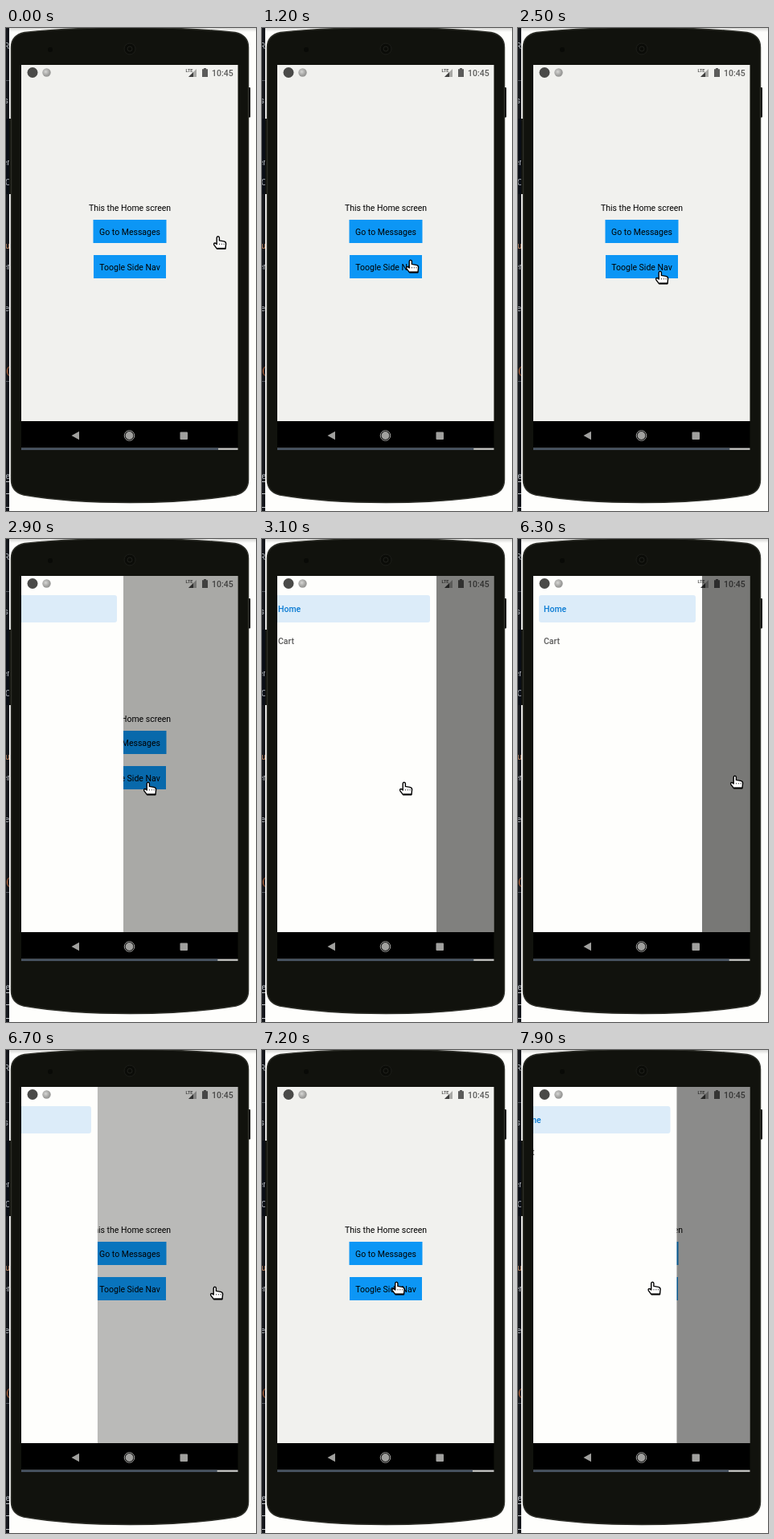
An HTML page for the animation above (8000 ms loop, 311 by 602 pixels).

```html
<!DOCTYPE html>
<html lang="en">
<head>
<meta charset="utf-8">
<title>Side navigation demo</title>
<style>
html, body { margin: 0; width: 100%; height: 100%; overflow: hidden; background: #fefefc; }
svg { display: block; width: 100%; height: 100%; }
text { font: 10.5px Roboto, sans-serif; }
.mid { text-anchor: middle; }
.medium { font-weight: 500; }
.code text { font: 11px Roboto, sans-serif; fill: #a9adb3; text-anchor: end; }
</style>
</head>
<body>
<svg viewBox="0 0 311 602" preserveAspectRatio="none">
  <defs>
    <clipPath id="screen"><rect x="19" y="46" width="269.5" height="444"/></clipPath>
    <clipPath id="editor"><rect width="4" height="602"/></clipPath>
    <linearGradient id="shade" x2="0" y2="1">
      <stop stop-color="#d8d8d6"/><stop offset="1" stop-color="#fefefc"/>
    </linearGradient>
    <radialGradient id="ball" cx=".4" cy=".4">
      <stop stop-color="#d6d6d4"/><stop offset="1" stop-color="#9a9a98"/>
    </radialGradient>
  </defs>

  <rect width="311" height="602" fill="#fefefc"/>
  <rect width="311" height="5" fill="url(#shade)"/>

  <g class="code" clip-path="url(#editor)">
    <rect width="4" height="602" fill="#15171c"/>
    <rect y="113" width="4" height="94" fill="#0a0e16"/>
    <text x="4" y="26">R</text>
    <text x="3" y="94">s</text>
    <text x="5" y="171">er</text>
    <text x="6" y="196">C</text>
    <text x="5" y="275" style="fill:#c58a64">u</text>
    <text x="5" y="301">er</text>
    <text x="4" y="353">e</text>
    <text x="4" y="431" style="fill:#d0703c">(</text>
    <text x="5" y="562">e</text>
    <path d="M0 65.5H4M0 440.5H4" stroke="#50545c"/>
    <path d="M0 565.5H4M0 580.5H4M0 597.5H4" stroke="#c4c6c9"/>
  </g>

  <g fill="#11120d">
    <rect x="4" y="113" width="4" height="94"/>
    <rect x="300" y="74" width="4" height="37.5" rx="1"/>
    <path d="M6.500 24Q6.500 9 23 5.500Q80 -.5 154 -.5T285 5.500Q301.500 9 301.500 24V563Q301.500 578 286 582Q230 591.500 154 591.500T22 582Q6.500 578 6.500 563Z" stroke="#2c2d27" stroke-width="1.500"/>
  </g>
  <circle cx="55" cy="27" r="3" fill="#090a07"/>
  <circle cx="154" cy="26" r="7" fill="#0b0c08" stroke="#1d1e19"/>
  <circle cx="154" cy="26" r="3" fill="none" stroke="#20211c"/>

  <g clip-path="url(#screen)">
    <rect x="19" y="46" width="270" height="444" fill="#f1f1ee"/>
    <text class="mid" x="154" y="228">This the Home screen</text>
    <path d="M108.500 239h91v29h-91zM109 283h90v29h-90z" fill="#0c96f5"/>
    <text class="mid" x="154" y="257.500">Go to Messages</text>
    <text class="mid" x="154" y="301.500">Toogle Side Nav</text>
    <rect id="dim" x="19" y="46" width="270" height="444"/>
    <g id="drawer">
      <rect x="19" y="46" width="210" height="444" fill="#fefefc"/>
      <rect x="26" y="70" width="195" height="34" rx="3" fill="#dcecf9"/>
      <text class="medium" x="32" y="91" fill="#0a7bd3">Home</text>
      <text class="medium" x="32" y="131" fill="#5a5a5a">Cart</text>
    </g>
    <circle cx="33" cy="55.500" r="6.500" fill="#4a4a48"/>
    <circle cx="50.500" cy="55.500" r="5.200" fill="url(#ball)"/>
    <g fill="#000" fill-opacity=".62">
      <text x="223.500" y="54.500" style="font-size:5.500px;font-weight:700">LTE</text>
      <path d="M237 51V61H227Z" fill-opacity=".3"/>
      <path d="M233 55V61H227Z"/>
      <path d="M246 50h3v1.200h2v9.800h-7v-9.800h2z"/>
      <text class="medium" x="256" y="59.500">10:45</text>
    </g>
  </g>

  <rect x="19" y="490" width="269.500" height="34" fill="#000"/>
  <g fill="#a0a09e">
    <path d="M81.500 508L91 502.800V513.200Z"/>
    <circle cx="153.500" cy="508" r="4.900"/>
    <circle cx="153.500" cy="508" r="6.300" fill="none" stroke="#a0a09e"/>
    <rect x="216.500" y="503.500" width="9.500" height="9.500" rx="1"/>
  </g>
  <rect x="19" y="523.500" width="269.500" height="2.300" fill="#c9c9c7"/>
  <rect id="progress" x="19" y="523.500" width="245" height="2.300" fill="#3b4858"/>

  <g id="cursor">
    <path d="M-3.800 2V-6Q-3.800 -7.800 -2.200 -7.800T-.6 -6V-2.600L5 -1.600Q7.800 -1 7.600 1.500L7 7.600H-3.600L-7.200 2.800Q-8 .2 -5.500 .6Z" fill="#fff" stroke="#000" stroke-width="1.400" stroke-linejoin="round"/>
    <path d="M-1 1.800H6" stroke="#000" stroke-dasharray="1 1.800"/>
    <path d="M-3.600 7.400H7" stroke="#000" stroke-width="2"/>
  </g>
</svg>
<script>
const LOOP = 8000, TICK = 100, WIDTH = 210, DECAY = 0.38;
const $ = id => document.getElementById(id);

// Pointer stops: time, x, y
const stops = [
  [500, 266, 267.5], [600, 260, 267.5], [700, 260, 267.5],
  [1200, 187, 297], [1400, 187, 297], [1800, 179, 311], [3900, 179, 311],
  [4500, 35, 114], [4800, 58, 131], [4900, 58, 131],
  [5000, 63, 135], [5200, 86, 146], [5300, 86, 146],
  [5700, 302, 315], [5900, 302, 315], [6100, 277, 303], [6200, 277, 303],
  [6300, 272, 303], [6400, 272, 303], [6600, 262, 303], [6700, 262, 303],
  [7200, 169.5, 297], [LOOP, 169.5, 297]
];

function pointerAt(t) {
  const i = stops.findIndex(s => s[0] >= t);
  const [t1, x1, y1] = stops[i];
  if (i === 0) return [x1, y1];
  const [t0, x0, y0] = stops[i - 1];
  const u = (t - t0) / (t1 - t0), k = u * u * (3 - 2 * u);
  return [x0 + (x1 - x0) * k, y0 + (y1 - y0) * k];
}

const opening = (t, start) => 1 - 1.04 * DECAY ** ((t - start) / TICK + 1);

function openness(t) {
  if (t >= 7800) return opening(t, 7800);
  if (t >= 7200 || t < 2900) return 0;
  if (t >= 6700) return 0.452 * DECAY ** ((t - 6700) / TICK);
  return t > 3400 ? 1 : opening(t, 2900);
}

function draw(now) {
  const t = Math.floor(now % LOOP / TICK) * TICK;
  const open = openness(t);
  const [x, y] = pointerAt(t);
  const played = t < 1000 ? 245 : t < 4400 ? 244.3 : t < 7000 ? 243.7 : 243;
  $("drawer").setAttribute("transform", `translate(${(open ? open - 1 : -1.1) * WIDTH} 0)`);
  $("dim").setAttribute("opacity", open / 2);
  $("cursor").setAttribute("transform", `translate(${x} ${y})`);
  $("progress").setAttribute("width", played);
}

const start = performance.now();
function frame() {
  draw(performance.now() - start);
  requestAnimationFrame(frame);
}
frame();
</script>
</body>
</html>
```
